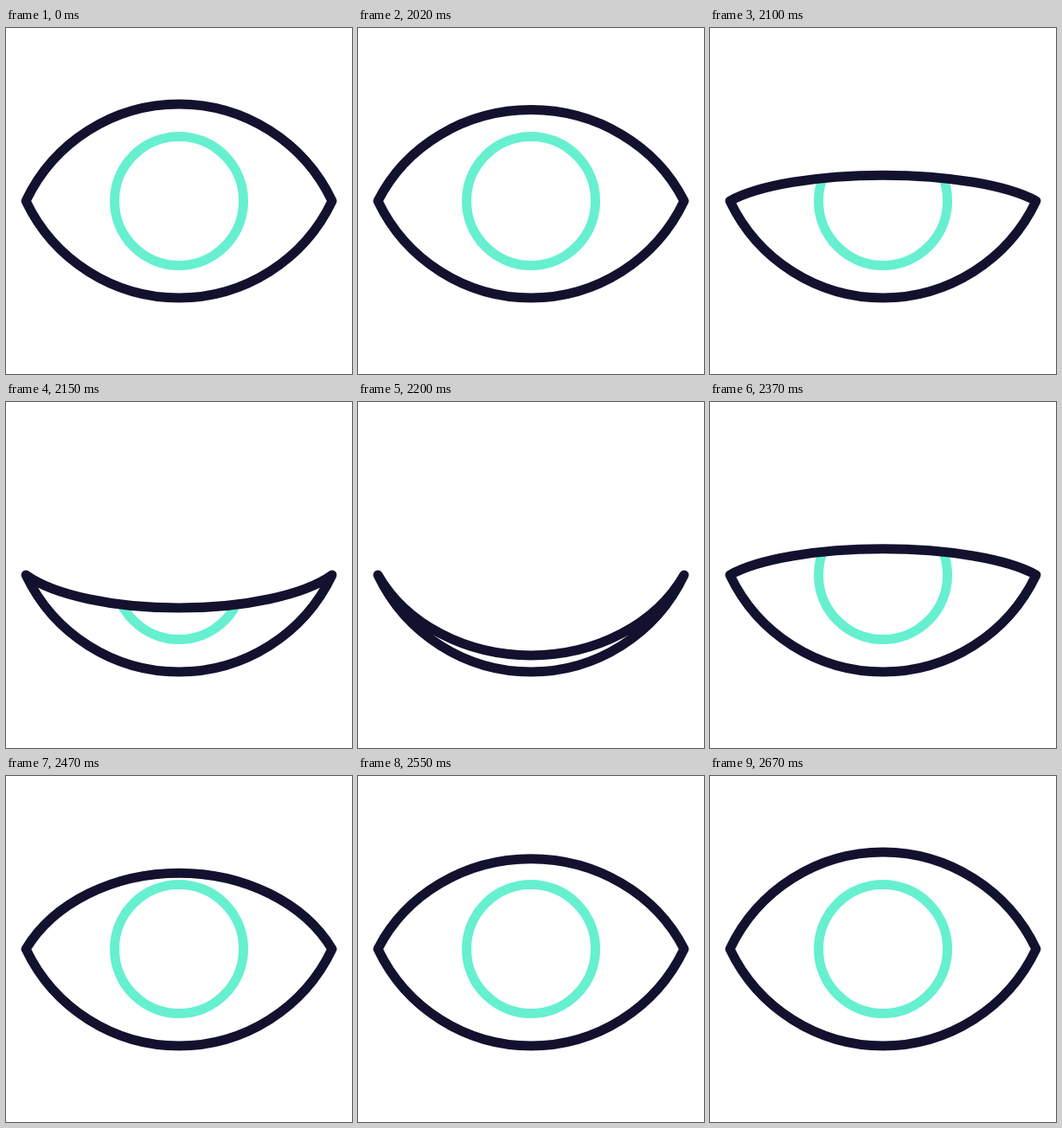
Animation, 400 px wide and 400 px high, one loop 2700 ms. Source, as an HTML page with a canvas:

```html
<!DOCTYPE html>
<html lang="en">
<head>
<meta charset="utf-8">
<title>Blinking eye</title>
<style>
  html, body { margin: 0; width: 100%; height: 100%; overflow: hidden; background: #fff; }
  canvas { display: block; width: 400px; height: 400px; }
</style>
</head>
<body>
<canvas id="stage" width="400" height="400"></canvas>
<script>
const ctx = document.getElementById('stage').getContext('2d');
const LOOP = 2700, STEP = 25;
const CLOSE = 2000, SHUT = 2243.75, OPEN = 2674;
const MID = 200, HALF = 177, RISE = 112;
const INK = '#12122f', MINT = '#66f0d0';

// Cubic easing with handles (x1, 0) and (x2, 1)
function ease(x, x1, x2) {
  if (x <= 0) return 0;
  if (x >= 1) return 1;
  let lo = 0, hi = 1;
  for (let i = 0; i < 30; i++) {
    const m = (lo + hi) / 2, n = 1 - m;
    if (3 * x1 * m * n * n + 3 * x2 * m * m * n + m * m * m < x) lo = m;
    else hi = m;
  }
  return lo * lo * (3 - 2 * lo);
}

// 0 = open, 1 = shut
function closure(t) {
  return t < SHUT
    ? ease((t - CLOSE) / (SHUT - CLOSE), 1 / 3, 2 / 3)
    : 1 - ease((t - SHUT) / (OPEN - SHUT), 1 / 3, 0);
}

// Motion runs at 40 steps per second on a 10 ms clock
function snap(t) {
  const tick = Math.floor(t / 10);
  return (Math.ceil((tick + 1) / 2.5) - 1) * STEP;
}

// Half of the outline; dir = 1 runs left to right, -1 runs back
function lid(path, s, dir) {
  const x = d => MID + dir * d, y = h => MID - s * h;
  path.bezierCurveTo(x(32.4 - HALF), y(68.3), x(-75.6), y(RISE), MID, y(RISE));
  path.bezierCurveTo(x(75.6), y(RISE), x(HALF - 32.4), y(68.3), x(HALF), MID);
}

function draw(t) {
  const eye = new Path2D();
  eye.moveTo(MID - HALF, MID);
  lid(eye, 1 - 2 * closure(t), 1);
  lid(eye, -1, -1);
  eye.closePath();

  ctx.fillStyle = '#fff';
  ctx.fillRect(0, 0, 400, 400);
  ctx.lineWidth = 11;
  ctx.lineJoin = 'round';

  ctx.save();
  ctx.clip(eye);
  ctx.strokeStyle = MINT;
  ctx.beginPath();
  ctx.arc(MID, MID, 74.5, 0, Math.PI * 2);
  ctx.stroke();
  ctx.restore();

  ctx.strokeStyle = INK;
  ctx.stroke(eye);
}

const start = performance.now();
function tick() {
  draw(snap((performance.now() - start) % LOOP));
  requestAnimationFrame(tick);
}
tick();
</script>
</body>
</html>
```
